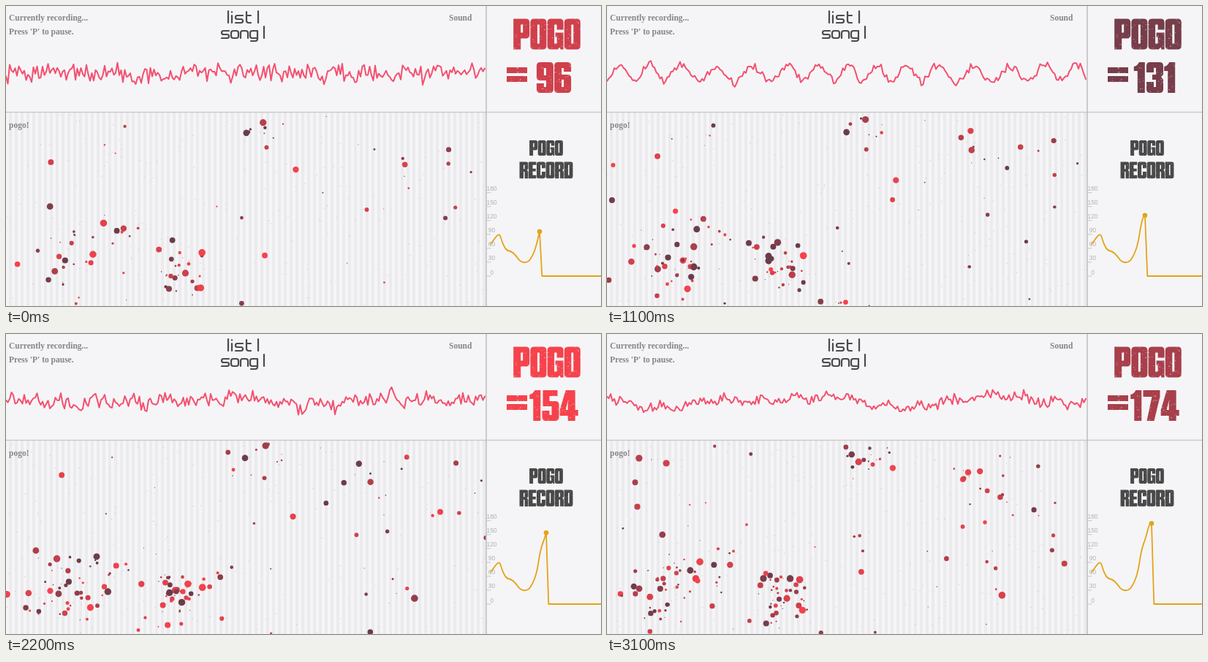
Recreate the animation shown at these times as an HTML page with a canvas. Size 814x411 px, loop 3.2 s.

```html
<!DOCTYPE html>
<html lang="en">
<head>
<meta charset="utf-8">
<title>Pogo recorder</title>
<style>
  html, body { margin: 0; width: 100%; height: 100%; overflow: hidden; background: #f5f5f7; }
  canvas { display: block; }
</style>
</head>
<body>
<canvas width="814" height="411" aria-label="Sound wave, pogo dots and pogo record"></canvas>
<script>
const ctx = document.querySelector('canvas').getContext('2d');
const LOOP = 3200, STEP = 100, SPLIT_X = 657, SPLIT_Y = 145;
const PAPER = '#f5f5f7', DARK = [105, 60, 74], RED = [246, 66, 76];

// Heavy condensed lettering, 42 units high: [advance width, outline]
const GLYPHS = {
  P: [22, 'M0 0H17Q22 0 22 5V22Q22 27 17 27H10V42H0ZM10 8V19H13V8Z'],
  O: [22, 'M5 0H17Q22 0 22 5V37Q22 42 17 42H5Q0 42 0 37V5Q0 0 5 0ZM9.5 8V34H12.5V8Z'],
  G: [22, 'M5 0H17Q22 0 22 5V15H13V8H9.5V34H13V25H11V19H22V42H18L17 39L14 42H5Q0 42 0 37V5Q0 0 5 0Z'],
  R: [22, 'M0 0H17Q22 0 22 5V17L19 21L22 25V42H13V25H10V42H0ZM10 8V18H13V8Z'],
  E: [19, 'M0 0H19V8H10V17H18V24H10V34H19V42H0Z'],
  C: [22, 'M5 0H17Q22 0 22 5V16H13V8H9.5V34H13V25H22V37Q22 42 17 42H5Q0 42 0 37V5Q0 0 5 0Z'],
  D: [22, 'M0 0H17Q22 0 22 5V37Q22 42 17 42H0ZM10 8V34H13V8Z'],
  '=': [28, 'M0 7H28V15H0ZM0 19H28V27H0Z'],
  1: [16, 'M15 0V42H5V12H0V6Q5 5 7 0Z'],
  2: [23, 'M5 0H18Q23 0 23 5V17L11 33V34H23V42H0V32L13 15V8H10V15H0V5Q0 0 5 0Z'],
  3: [23, 'M5 0H18Q23 0 23 5V17L20 20L23 24V37Q23 42 18 42H5Q0 42 0 37V27H10V34H13V24H8V17H13V8H10V14H0V5Q0 0 5 0Z'],
  4: [25, 'M8 0H21V27H25V35H21V42H11V35H0V27ZM11 14L8 27H11Z'],
  5: [23, 'M1 0H21V8H10V15H18Q23 15 23 20V37Q23 42 18 42H5Q0 42 0 37V28H10V34H13V22H1Z'],
  6: [23, 'M5 0H18Q23 0 23 5V13H13V8H10V17H18Q23 17 23 22V37Q23 42 18 42H5Q0 42 0 37V5Q0 0 5 0ZM10 24V34H13V24Z'],
  7: [23, 'M0 0H23V9L15 42H5L12 9H0Z'],
  8: [23, 'M5 0H18Q23 0 23 5V17L20 20.5L23 24V37Q23 42 18 42H5Q0 42 0 37V24L3 20.5L0 17V5Q0 0 5 0ZM10 8V17H13V8ZM10 24V34H13V24Z'],
  9: [23, 'M5 0H18Q23 0 23 5V37Q23 42 18 42H5Q0 42 0 37V29H10V34H13V25H5Q0 25 0 20V5Q0 0 5 0ZM10 8V18H13V8Z']
};
GLYPHS[0] = GLYPHS.O;

// Thin rounded lettering, x-height 10
const THIN = {
  l: 'M0 -6V10',
  i: 'M0 0V10M0 -5V-4.5',
  s: 'M10 0H2.5Q0 0 0 2.5T2.5 5H7.5Q10 5 10 7.5T7.5 10H0',
  t: 'M0 -5V7Q0 10 3 10H6M0 0H6',
  o: 'M3 0H7Q10 0 10 3V7Q10 10 7 10H3Q0 10 0 7V3Q0 0 3 0Z',
  n: 'M0 10V3Q0 0 3 0H7Q10 0 10 3V10',
  g: 'M10 10H3Q0 10 0 7V3Q0 0 3 0H10V11Q10 14 7 14H1'
};

const KEY_TIMES = [0, 700, 1100, 1600, 2200, 2600, 3100];
const TRACKS = {
  pogo:   [96, 116, 131, 138, 154, 171, 174],
  tint:   [.72, .82, .1, .22, 1, .6, .45],
  ripple: [3, 5, 11, 14, 4, 4, 3],
  rough:  [15, 16, 7, 6, 13, 15, 9],
  drift:  [3, 3, 2, 5, 6, 6, 11]
};

function valueAt(track, time) {
  let i = KEY_TIMES.findLastIndex(key => key <= time);
  i = Math.min(i, KEY_TIMES.length - 2);
  const k = Math.min(1, (time - KEY_TIMES[i]) / (KEY_TIMES[i + 1] - KEY_TIMES[i]));
  return TRACKS[track][i] + (TRACKS[track][i + 1] - TRACKS[track][i]) * k;
}

function seeded(seed) {
  return () => {
    seed = (seed + 0x6D2B79F5) | 0;
    let h = Math.imul(seed ^ seed >>> 15, 1 | seed);
    h = h + Math.imul(h ^ h >>> 7, 61 | h) ^ h;
    return ((h ^ h >>> 14) >>> 0) / 4294967296;
  };
}

const wrap = (value, size) => ((value % size) + size) % size;
const tone = k => `rgb(${DARK.map((c, i) => Math.round(c + (RED[i] - c) * k))})`;

// Crowded spots: x, y, spread x, spread y, share of the dots
const CROWDS = [[70, 355, 60, 50, .17], [238, 362, 45, 42, .18], [345, 165, 55, 22, .08],
                [508, 200, 35, 32, .07], [120, 310, 90, 60, .1]];

function makeDots(count) {
  const random = seeded(41);
  const bell = () => random() + random() - 1;
  return Array.from({ length: count }, () => {
    let pick = random();
    const crowd = CROWDS.find(c => (pick -= c[4]) < 0);
    return {
      x: crowd ? crowd[0] + bell() * crowd[2] : random() * SPLIT_X,
      y: crowd ? crowd[1] + bell() * crowd[3] : 148 + random() * 263,
      radius: .6 + 4.3 * random() ** 1.5,
      reach: crowd ? 14 : 40,
      turns: 1 + Math.floor(random() * 3),
      phase: random() * 7,
      hue: random()
    };
  });
}
const dots = makeDots(180);

function line(points, color, width) {
  ctx.beginPath();
  points.forEach(([x, y]) => ctx.lineTo(x, y));
  ctx.strokeStyle = color;
  ctx.lineWidth = width;
  ctx.stroke();
}

function disc(x, y, radius, color) {
  ctx.beginPath();
  ctx.arc(x, y, radius, 0, Math.PI * 2);
  ctx.fillStyle = color;
  ctx.fill();
}

function label(text, x, y, font, color, align = 'left') {
  ctx.font = font;
  ctx.textAlign = align;
  ctx.fillStyle = color;
  ctx.fillText(text, x, y);
}

function heavy(text, center, top, scale, color) {
  const widths = [...text].map(c => GLYPHS[c][0] + 1.2);
  const total = widths.reduce((a, b) => a + b) - 1.2;
  const random = seeded(9);
  ctx.save();
  ctx.translate(center - total * scale / 2, top);
  ctx.scale(scale, scale);
  ctx.fillStyle = color;
  ctx.save();
  [...text].forEach((c, i) => {
    ctx.fill(new Path2D(GLYPHS[c][1]), 'evenodd');
    ctx.translate(widths[i], 0);
  });
  ctx.restore();
  // worn print
  ctx.fillStyle = 'rgba(245,245,247,.55)';
  for (let i = 0; i < total * .9; i++) {
    ctx.fillRect(random() * total, random() * 42, .5 + random() * 1.6, .4 + random() * .8);
  }
  ctx.restore();
}

function thin(text, xs, top) {
  ctx.strokeStyle = '#4b4b4d';
  ctx.lineWidth = 2.2;
  [...text].forEach((c, i) => {
    ctx.save();
    ctx.translate(xs[i], top);
    ctx.stroke(new Path2D(THIN[c]));
    ctx.restore();
  });
}

function drawWave(time) {
  const random = seeded(500 + time);
  const [ripple, rough, drift] = ['ripple', 'rough', 'drift'].map(t => valueAt(t, time));
  const phase = random() * 7;
  const points = [];
  for (let x = 0; x <= 656; x += 2.5) {
    const wave = Math.sin(x / 7 + phase + Math.sin(x / 55));
    const slow = Math.sin(x / 47 + phase * 2) * .6 + Math.sin(x / 29 + phase) * .4;
    points.push([x, 92 + ripple * wave + drift * slow + rough * (random() + random() - 1)]);
  }
  line(points, '#f4506f', 2);
}

function drawDots(time) {
  ctx.save();
  ctx.beginPath();
  ctx.rect(0, SPLIT_Y + 1, SPLIT_X, 411);
  ctx.clip();
  ctx.fillStyle = '#ebebed';
  for (let x = 4; x < SPLIT_X; x += 8) ctx.fillRect(x, SPLIT_Y, 4, 266);

  const random = seeded(900 + time);
  ctx.fillStyle = 'rgba(120,70,85,.4)';
  for (let i = 0; i < 150; i++) ctx.fillRect(random() * SPLIT_X, 147 + random() * 264, .9, .9);

  dots.slice(0, Math.round(valueAt('pogo', time))).forEach(d => {
    const angle = d.turns * time / LOOP * Math.PI * 2 + d.phase;
    const x = wrap(d.x + d.reach * Math.sin(angle), SPLIT_X);
    const y = 148 + wrap(d.y - 148 + d.reach * Math.cos(angle * 2 + d.phase), 263);
    disc(x, y, d.radius, tone(.5 + .5 * Math.sin(d.hue * 7 + angle)));
  });
  ctx.restore();
}

function drawChart(time) {
  for (let value = 0; value <= 180; value += 30) {
    const y = 370 - value * .635;
    label(value, 664.5, y - 2.5, '8.5px "Liberation Sans", Arial, sans-serif', '#b2b2b5', 'center');
    line([[657, y], [663, y]], '#c6c6c9', 1);
  }
  const gold = '#e4a318';
  const height = value => 370 - value * .635;
  const bin = Math.floor((time + 175) / 625);
  const curve = [[663, 326], [667, 321], [671, 315], [675, 312.5], [677, 317], [680, 327], [685, 335],
                 [691, 336], [697, 341], [704, 351], [714, 351.5], [720, 343], [724, 333], [727, 322]];
  for (let i = 0; i < bin; i++) curve.push([730 + 3 * i, height(valueAt('pogo', i * 625 + 350))]);
  const x = 730 + 3 * bin, y = height(valueAt('pogo', time));

  ctx.beginPath();
  ctx.moveTo(...curve[0]);
  curve.forEach((p, i) => {
    const next = curve[i + 1] || [x, y];
    ctx.quadraticCurveTo(...p, (p[0] + next[0]) / 2, (p[1] + next[1]) / 2);
  });
  [[x, y], [x + 3.3, 370], [814, 370]].forEach(p => ctx.lineTo(...p));
  ctx.strokeStyle = gold;
  ctx.lineWidth = 1.8;
  ctx.stroke();
  disc(x, y, 3.3, gold);
}

function draw(time) {
  ctx.fillStyle = PAPER;
  ctx.fillRect(0, 0, 814, 411);
  ctx.lineCap = ctx.lineJoin = 'round';

  drawDots(time);
  drawWave(time);
  line([[0, SPLIT_Y + .5], [814, SPLIT_Y + .5]], '#c9c9cb', 1.6);
  line([[SPLIT_X, 0], [SPLIT_X, 411]], '#c0c0c3', 1.6);

  const serif = 'bold 11.5px "Liberation Serif", "Times New Roman", serif';
  label('Currently recording...', 4, 19.5, serif, '#858587');
  label("Press 'P' to pause.", 4, 38.5, serif, '#858587');
  label('Sound', 606, 19.5, serif, '#858587');
  label('pogo!', 4, 167, serif, '#858587');
  thin('listl', [304, 309, 314, 329, 345], 13);
  thin('songl', [295, 308, 321, 334, 353], 34);

  const color = tone(valueAt('tint', time));
  heavy('POGO', 740, 17.5, 1, color);
  heavy('=', 699, 77, 1, color);
  heavy(String(Math.round(valueAt('pogo', time))), 749.5, 77, 1, color);
  heavy('POGO', 739, 184, .5, '#484849');
  heavy('RECORD', 739, 213.5, .54, '#484849');
  drawChart(time);
}

function tick() {
  draw(Math.floor(performance.now() % LOOP / STEP) * STEP);
  requestAnimationFrame(tick);
}
tick();
</script>
</body>
</html>
```
